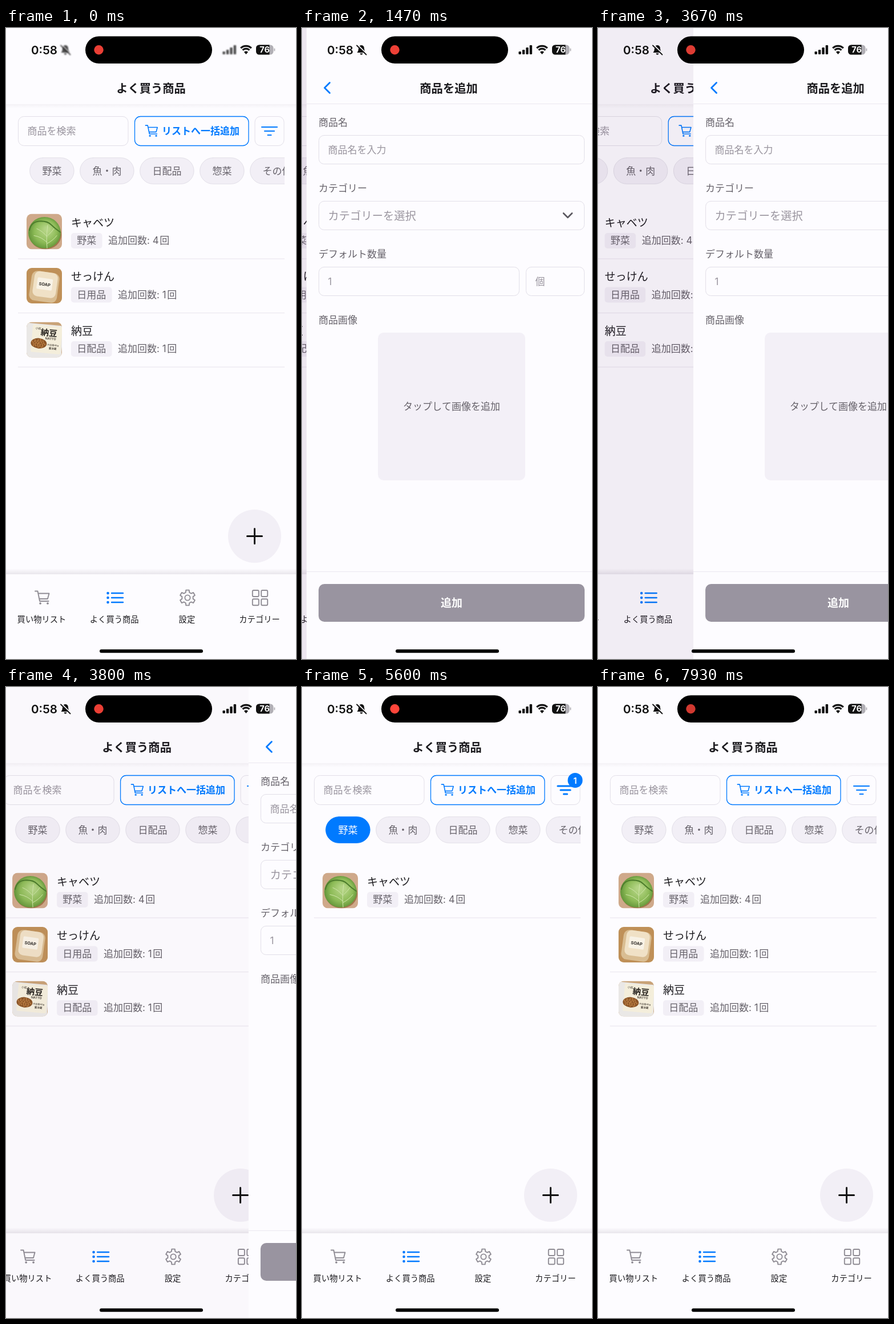
Animation of 508 by 1102 pixels, one loop 8 s. Source, as an HTML page with a canvas:

```html
<!DOCTYPE html>
<html lang="ja">
<head>
<meta charset="utf-8">
<title>よく買う商品</title>
<style>
html, body { margin: 0; width: 100%; height: 100%; overflow: hidden; background: #fdfcff; }
canvas { display: block; width: 508px; height: 1102px; }
</style>
</head>
<body>
<canvas id="stage"></canvas>
<script>
const W = 508, H = 1102, LOOP = 8000;
const FONT = 'Inter, "Noto Sans CJK JP", "Noto Sans CJK", sans-serif';
const BG = '#fdfcff', BLUE = '#007aff', INK = '#1b1a1e', GRAY = '#66626a',
      HINT = '#9a959f', SOFT = '#f2eff6', LINE = '#e2dfe8', ICON = '#8f8c94';

const canvas = document.getElementById('stage');
const ctx = canvas.getContext('2d');
const dpr = window.devicePixelRatio || 1;
canvas.width = W * dpr;
canvas.height = H * dpr;

const clamp = v => Math.max(0, Math.min(1, v));

// Cubic bezier easing, solved for x by bisection.
function easeOut(x) {
  if (x <= 0 || x >= 1) return clamp(x);
  const at = (a, b, s) => 3 * a * s * (1 - s) ** 2 + 3 * b * s * s * (1 - s) + s ** 3;
  let lo = 0, hi = 1;
  for (let i = 0; i < 24; i++) {
    const mid = (lo + hi) / 2;
    if (at(.35, .33, mid) < x) lo = mid; else hi = mid;
  }
  return at(.91, .97, lo);
}

// y is the vertical centre of the glyphs.
function text(str, x, y, size, color, weight = 400, align = 'left') {
  ctx.font = `${weight} ${size}px ${FONT}`;
  ctx.textAlign = align;
  ctx.fillStyle = color;
  ctx.fillText(str, x, y + size * .38);
}

function box(x, y, w, h, r, fill, stroke, lw = 1) {
  ctx.beginPath();
  ctx.roundRect(x, y, w, h, r);
  if (fill) { ctx.fillStyle = fill; ctx.fill(); }
  if (stroke) { ctx.strokeStyle = stroke; ctx.lineWidth = lw; ctx.stroke(); }
}

function oval(x, y, rx, ry, fill, angle = 0) {
  ctx.beginPath();
  ctx.ellipse(x, y, rx, ry, angle, 0, 7);
  ctx.fillStyle = fill;
  ctx.fill();
}

const disc = (x, y, r, fill) => oval(x, y, r, r, fill);

function stroke(d, color, lw) {
  ctx.strokeStyle = color;
  ctx.lineWidth = lw;
  ctx.lineCap = ctx.lineJoin = 'round';
  ctx.stroke(new Path2D(d));
}

function at(x, y, draw, scale = 1, angle = 0) {
  ctx.save();
  ctx.translate(x, y);
  ctx.scale(scale, scale);
  ctx.rotate(angle);
  draw();
  ctx.restore();
}

function shade(y, h, from, to) {
  const g = ctx.createLinearGradient(0, y, 0, y + h);
  g.addColorStop(0, `rgba(70,50,80,${from})`);
  g.addColorStop(1, `rgba(70,50,80,${to})`);
  ctx.fillStyle = g;
  ctx.fillRect(0, y, W, h);
}

function cart(x, y, scale, color) {
  at(x, y, () => {
    stroke('M-12.5-11h4.5l3.6 17.5h15.5M-7.2-7H12l-2.6 9.5H-5.2', color, 1.9);
    disc(-3.4, 10.3, 1.9, color);
    disc(9.5, 10.3, 1.9, color);
  }, scale);
}

function gear(x, y) {
  ctx.beginPath();
  for (let i = 0; i < 6; i++) {
    [[-.33, 9.8], [-.2, 13.6], [.2, 13.6], [.33, 9.8]].forEach(([da, r]) => {
      const a = i * Math.PI / 3 + da - Math.PI / 2;
      ctx.lineTo(x + r * Math.cos(a), y + r * Math.sin(a));
    });
  }
  ctx.closePath();
  ctx.strokeStyle = ICON;
  ctx.lineWidth = 1.9;
  ctx.lineJoin = 'round';
  ctx.stroke();
  ctx.beginPath();
  ctx.arc(x, y, 4.6, 0, 7);
  ctx.stroke();
}

function cabbage() {
  ctx.fillStyle = '#cfa98a';
  ctx.fillRect(0, 0, 62, 62);
  oval(33, 37, 28, 25, '#a3754c');
  const g = ctx.createRadialGradient(36, 27, 4, 32, 33, 30);
  g.addColorStop(0, '#b4d485');
  g.addColorStop(.6, '#8dbb57');
  g.addColorStop(1, '#5f9136');
  oval(31.5, 33, 28.5, 27.5, g);
  stroke('M5 29Q8 14 22 13T43 19T59 32', '#4d7d2c', 2);
  stroke('M36 60Q34 42 37 20M36 50Q26 40 13 38M36 40Q28 30 18 26M36 52Q47 46 53 38M37 38Q44 32 48 26', '#cfe5a9', 1);
}

function soap() {
  ctx.fillStyle = '#bf9058';
  ctx.fillRect(0, 0, 62, 62);
  at(31, 30, () => {
    box(-24, -23, 49, 52, 10, '#d9bd92');
    box(-19, -23, 41, 44, 9, '#f0e1c6');
    box(-13, -12, 27, 20, 2, '#f8f2e6');
    text('SOAP', .5, -1.500, 7.4, '#33302c', 700, 'center');
  }, 1, .14);
}

function natto() {
  ctx.fillStyle = '#c9a378';
  ctx.fillRect(0, 0, 62, 62);
  at(31, 31, () => {
    box(-34, -27, 66, 60, 6, '#eae8e6');
    box(-22, -25, 52, 48, 2, '#f4eedb');
    text('小粒', -12, -19, 5, '#443d35', 500, 'center');
    text('納豆', 7, -13, 14.5, '#24201c', 700, 'center');
    text('NATTO', 11, -3, 5.5, '#443d35', 600, 'center');
    oval(-9, 7, 14, 9, '#8a5427');
    for (let i = 0; i < 26; i++) {
      const r = Math.sqrt(i / 26), a = i * 2.4;
      disc(-9 + 12 * r * Math.cos(a), 7 + 7.5 * r * Math.sin(a), 1.4, '#b67a3f');
    }
    text('内容量40g', 16, 8, 4, '#443d35', 500, 'center');
    text('要冷蔵', 16, 14, 4.5, '#443d35', 700, 'center');
  }, 1, .09);
}

const items = [
  ['キャベツ', '野菜', 4, cabbage],
  ['せっけん', '日用品', 1, soap],
  ['納豆', '日配品', 1, natto],
];

function itemRow([name, tag, count, picture], i) {
  const y = 324.5 + i * 94.5, tagW = tag.length * 17 + 20.5;
  at(36, y, () => {
    ctx.beginPath();
    ctx.roundRect(0, 0, 62, 62, 9);
    ctx.clip();
    picture();
  });
  text(name, 114, y + 15, 19, INK, 500);
  box(114, y + 33.5, tagW, 27, 5, SOFT);
  text(tag, 124.3, y + 46.5, 17, GRAY);
  text(`追加回数: ${count}\u200a回`, 114 + tagW + 10.5, y + 46.5, 17, GRAY);
  ctx.fillStyle = '#ebe7ef';
  ctx.fillRect(21, y + 78, 467, 1.2);
}

function chips(active) {
  ctx.save();
  ctx.beginPath();
  ctx.rect(21, 220, 467, 60);
  ctx.clip();
  let x = 41.7;
  ['野菜', '魚・肉', '日配品', '惣菜', 'その他'].forEach((label, i) => {
    const w = label.length * 17 + 43.4, on = i === 0 && active;
    box(x, 226.7, w, 45.6, 22.8, on ? BLUE : SOFT, on ? BLUE : LINE);
    text(label, x + w / 2, 249.5, 17, on ? '#fff' : GRAY, 500, 'center');
    x += w + 10.6;
  });
  ctx.restore();
}

function filterButton(active, pop) {
  box(436, 154.5, 51, 51, 10, BG, LINE);
  stroke('M448 173h27M453 180h17M458.5 187h6', BLUE, active ? 3.2 : 2.1);
  if (pop > 0) at(478.5, 163, () => {
    disc(0, 0, 13, BLUE);
    text('1', 0, 0, 15, '#fff', 600, 'center');
  }, pop);
}

function tabBar() {
  shade(944, 10, 0, .11);
  ctx.fillStyle = BG;
  ctx.fillRect(0, 954, W, 148);
  cart(63.5, 994.5, 1, ICON);
  [987, 995, 1003].forEach(y => {
    disc(178.5, y, 2.3, BLUE);
    stroke(`M185 ${y}h20`, BLUE, 2.4);
  });
  gear(318, 995);
  [431.8, 447.2].forEach(x => [982, 997.2].forEach(y => box(x, y, 11, 11, 2, null, ICON, 1.9)));
  ['買い物リスト', 'よく買う商品', '設定', 'カテゴリー'].forEach((label, i) =>
    text(label, 62.5 + i * 127.2, 1033, 14.3, INK, 500, 'center'));
}

function listPage(active, pop) {
  ctx.fillStyle = BG;
  ctx.fillRect(0, 0, W, H);
  shade(133, 7, .05, 0);
  text('よく買う商品', 254, 105, 20.3, INK, 700, 'center');
  box(21.5, 154.5, 192.5, 51, 10, BG, LINE);
  text('商品を検索', 37.5, 180, 17, HINT);
  box(225.5, 154.5, 199.5, 51, 10, BG, BLUE, 1.3);
  cart(255, 179.5, .85, BLUE);
  text('リストへ一括追加', 273, 180, 17, BLUE, 600);
  filterButton(active, pop);
  chips(active);
  items.slice(0, active ? 1 : 3).forEach(itemRow);
  disc(435.5, 887.5, 46.5, SOFT);
  stroke('M422.5 887.5h26M435.5 874.5v26', '#111', 3);
  tabBar();
}

function field(y, x, w, hint, size = 17) {
  box(x + .5, y + .5, w - 1, 50, 9, BG, LINE);
  text(hint, x + 16.5, y + 25.5, size, HINT);
}

function addPage() {
  ctx.fillStyle = BG;
  ctx.fillRect(0, 0, W, H);
  ctx.fillStyle = '#ebe8f0';
  ctx.fillRect(0, 132, W, 1);
  ctx.fillRect(0, 949, W, 1);
  stroke('M40.5 95.5l-9 9 9 9', BLUE, 2.8);
  text('商品を追加', 249, 105, 20.3, INK, 700, 'center');
  ['商品名', 'カテゴリー', 'デフォルト数量', '商品画像'].forEach((label, i) =>
    text(label, 21, 165 + i * 115, 17, GRAY, 500));
  field(187, 21, 466, '商品名を入力');
  field(302, 21, 466, 'カテゴリーを選択', 19.3);
  stroke('M450 323.5l7.5 7.5 7.5-7.5', '#5b5860', 2.6);
  field(417, 21, 352, '1');
  field(417, 384, 103, '個');
  box(125, 532, 258, 258, 10, '#f3f0f7');
  text('タップして画像を追加', 254, 661, 17, GRAY, 400, 'center');
  box(21, 971, 466, 66, 10, '#9994a0');
  text('追加', 254, 1004, 19, '#fff', 600, 'center');
}

function bell() {
  ctx.fillStyle = '#111';
  ctx.fill(new Path2D('M96.5 43Q99 40 99 36Q99 30.5 104 30Q109 30.5 109 36Q109 40 111.5 43ZM101.5 44.2h5q-.5 2.6-2.5 2.6t-2.5-2.6Z'));
  stroke('M97.5 29.5l16 16', BG, 2);
  stroke('M96 30.5l16.5 16', '#111', 1.8);
}

function statusBar(t) {
  text('0:58', 67, 37.8, 20.6, '#111', 600, 'center');
  ctx.save();
  if (t < 70) { ctx.globalAlpha = .75; ctx.filter = 'blur(1.2px)'; }
  bell();
  [5, 8, 12, 16].forEach((h, i) => box(379.5 + i * 6.4, 46 - h, 4.4, h, 1.2, '#111'));
  ctx.restore();
  ctx.strokeStyle = '#111';
  ctx.lineCap = 'butt';
  [13.2, 8.4].forEach(r => {
    ctx.beginPath();
    ctx.arc(420.5, 44.5, r, -Math.PI * .75, -Math.PI * .25);
    ctx.lineWidth = 3.2;
    ctx.stroke();
  });
  ctx.beginPath();
  ctx.moveTo(420.5, 46);
  ctx.arc(420.5, 45.5, 5, -Math.PI * .75, -Math.PI * .25);
  ctx.fillStyle = '#111';
  ctx.fill();
  ctx.save();
  ctx.beginPath();
  ctx.roundRect(438, 29.5, 30.5, 17, 5.5);
  ctx.clip();
  ctx.fillStyle = '#b2b0b6';
  ctx.fillRect(438, 29, 31, 18);
  ctx.fillStyle = '#111';
  ctx.fillRect(438, 29, 23.5, 18);
  ctx.restore();
  box(469.5, 35.5, 1.8, 5, 1, '#b2b0b6');
  text('76', 453, 37.8, 14.6, '#fff', 700, 'center');
  box(139, 14.5, 222, 47.5, 23.75, '#000');
  const glow = .91 + .09 * Math.cos((t - 1150) / 1500 * 2 * Math.PI);
  disc(162.5, 38.3, 8.2, `rgb(${255 * glow},${69 * glow},${58 * glow})`);
  box(164, 1085.3, 181, 6, 3, '#000');
}

function render(t) {
  ctx.setTransform(dpr, 0, 0, dpr, 0, 0);
  const push = easeOut((t - 1135) / 440) - easeOut((t - 3608) / 500);
  const active = t >= 5360 && t < 7200;
  const pop = clamp((t - 5340) / 130) - clamp((t - 7190) / 100);
  at(-.3 * W * push, 0, () => listPage(active, pop));
  if (push > 0) {
    ctx.fillStyle = `rgba(60,10,70,${.085 * push})`;
    ctx.fillRect(0, 0, W, H);
    at(W * (1 - push), 0, addPage);
  }
  statusBar(t);
}

function tick() {
  render(performance.now() % LOOP);
  requestAnimationFrame(tick);
}
tick();
</script>
</body>
</html>
```
